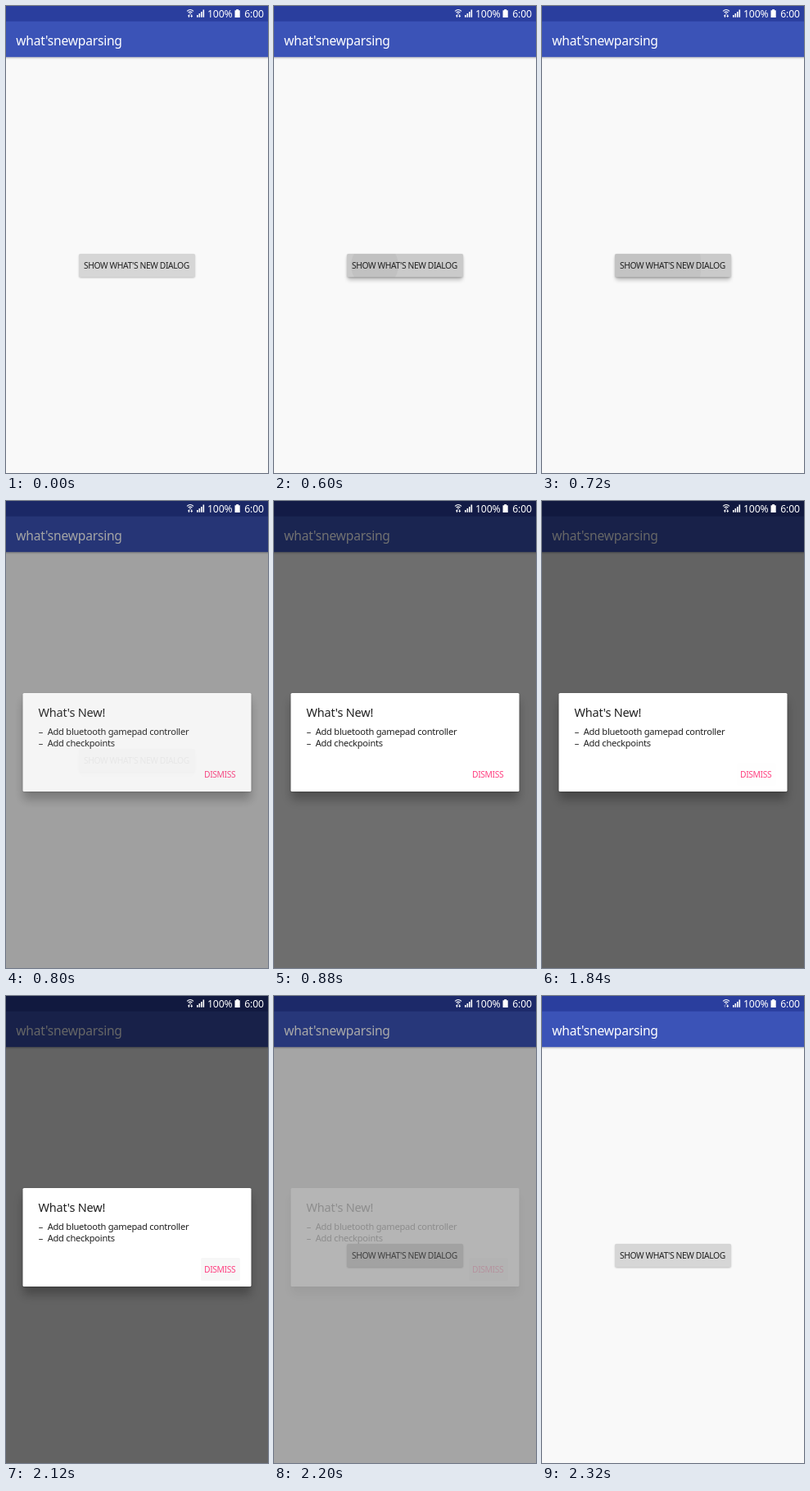
An HTML page that plays this animation: 320x569 px, repeating every 3000 ms.

```html
<!DOCTYPE html>
<html lang="en">
<head>
<meta charset="utf-8">
<title>What's New dialog</title>
<style>
  html, body { margin: 0; width: 100%; height: 100%; overflow: hidden; background: #f9f9f9; }
  svg { display: block; width: 100%; height: 100%; }
  text { font-family: "Noto Sans", "Open Sans", sans-serif; white-space: pre; }
  .bar { font-size: 15.6px; letter-spacing: -.22px; fill: #fff; }
  .status { font-size: 12.2px; letter-spacing: -.15px; fill: #fff; }
  .caps { font-size: 10.3px; letter-spacing: -.37px; }
  .heading { font-size: 14.5px; letter-spacing: -.2px; }
  .item { font-size: 11.1px; letter-spacing: -.25px; }
</style>
</head>
<body>
<svg viewBox="0 0 320 569" preserveAspectRatio="none">
  <defs>
    <filter id="soft1" x="-20%" y="-60%" width="140%" height="220%"><feGaussianBlur stdDeviation="1"/></filter>
    <filter id="soft3" x="-20%" y="-60%" width="140%" height="220%"><feGaussianBlur stdDeviation="2.6"/></filter>
    <filter id="soft6" x="-20%" y="-40%" width="140%" height="180%"><feGaussianBlur stdDeviation="6"/></filter>
    <clipPath id="buttonClip"><rect x="89" y="302" width="142" height="28.5" rx="1.5"/></clipPath>
  </defs>

  <rect width="320" height="569" fill="#f9f9f9"/>
  <rect x="-5" y="50" width="330" height="13.3" opacity=".25" filter="url(#soft1)"/>
  <rect y="18" width="320" height="44.2" fill="#3b53b7"/>
  <rect width="320" height="18.7" fill="#2a3e9e"/>
  <text class="bar" x="12.3" y="48">what'snewparsing</text>

  <rect x="89.5" y="303" width="141" height="28" rx="1.5" opacity=".28" filter="url(#soft1)"/>
  <rect id="lift" x="90" y="305" width="140" height="29" rx="2" filter="url(#soft3)"/>
  <g clip-path="url(#buttonClip)">
    <rect x="89" y="302" width="142" height="28.5" fill="#d6d6d6"/>
    <rect id="press" x="89" y="302" width="142" height="28.5"/>
    <circle id="ripple" cx="123" cy="316"/>
  </g>
  <text class="caps" x="95" y="320.3" fill="#212121">SHOW WHAT'S NEW DIALOG</text>

  <rect id="dim" width="320" height="569"/>

  <g id="dialog">
    <rect x="21" y="243" width="278" height="121" rx="3" opacity=".26" filter="url(#soft6)"/>
    <rect x="20.5" y="235" width="279" height="119.5" rx="2" opacity=".25" filter="url(#soft1)"/>
    <rect x="20.5" y="234" width="279" height="120" rx="1.6" fill="#fff"/>
    <rect id="dismissPress" x="238" y="319" width="48" height="28" rx="1.5"/>
    <g fill="#212121">
      <text class="heading" x="39.5" y="263">What's New!</text>
      <text class="item" x="39.8" y="285">–</text>
      <text class="item" x="50.7" y="285">Add bluetooth gamepad controller</text>
      <text class="item" x="39.8" y="298.5">–</text>
      <text class="item" x="50.7" y="298.5">Add checkpoints</text>
    </g>
    <text class="caps" x="242" y="336.6" fill="#ff4081">DISMISS</text>
  </g>

  <g fill="#fff">
    <g fill="none" stroke="#fff" stroke-width="1.1">
      <path d="M221 6.3Q225 2.8 229 6.3"/>
      <path d="M222.6 8.2Q225 6.1 227.4 8.2"/>
    </g>
    <circle cx="225" cy="9.4" r=".8"/>
    <path id="upload" d="M221.8 12.2L223.4 10.3L224.9 12.2H224V13.8H222.8V12.2Z"/>
    <path d="M225.2 12L226.7 13.9L228.2 12H227.3V10.4H226.1V12Z"/>
    <path d="M233 11h1.6v2.8H233zM235.5 9h1.6v4.8h-1.6zM238 7h1.6v6.8H238zM240.5 4.6h1.6v9.2h-1.6z"/>
    <text class="status" x="246" y="14">100%</text>
    <path d="M281.2 4h2.8v1.2h1.7v8.8h-6.2V5.2h1.7z"/>
    <text class="status" x="291.3" y="14">6:00</text>
  </g>
</svg>
<script>
  const LOOP = 3000, STEP = 40;
  const el = id => document.getElementById(id);
  const set = (id, name, value) => el(id).setAttribute(name, value);
  const fade = (id, value) => set(id, "opacity", value.toFixed(3));
  const progress = (t, start, length) => Math.min(1, Math.max(0, (t - start) / length));
  const easeOut = (p, power) => 1 - (1 - p) ** power;

  function draw(time) {
    const t = Math.floor(time / STEP) * STEP;

    const pressed = progress(t, 160, 120) * (1 - progress(t, 720, 160));
    fade("press", pressed * 0.055);
    fade("lift", pressed * 0.22);

    // The ripple holds for two steps, then spreads as the press is released.
    const spread = t < 680 ? 0 : progress(t, 640, 160);
    set("ripple", "r", 29 + 85 * spread);
    fade("ripple", t < 600 ? 0 : 0.045 * (1 - progress(t, 680, 160)));

    const shown = easeOut(progress(t, 720, 150), 3) * (1 - easeOut(progress(t, 2134, 150), 3));
    fade("dialog", shown);
    fade("dim", 0.6 * easeOut(progress(t, 720, 220), 2) * (1 - progress(t, 2120, 182)));
    fade("dismissPress", 0.03 * progress(t, 1800, 240));

    const idle = (t >= 960 && t < 1240) || t >= 2320;
    fade("upload", idle ? 0.35 : 1);
  }

  const began = performance.now();
  function tick() {
    draw((performance.now() - began) % LOOP);
    requestAnimationFrame(tick);
  }
  tick();
</script>
</body>
</html>
```
